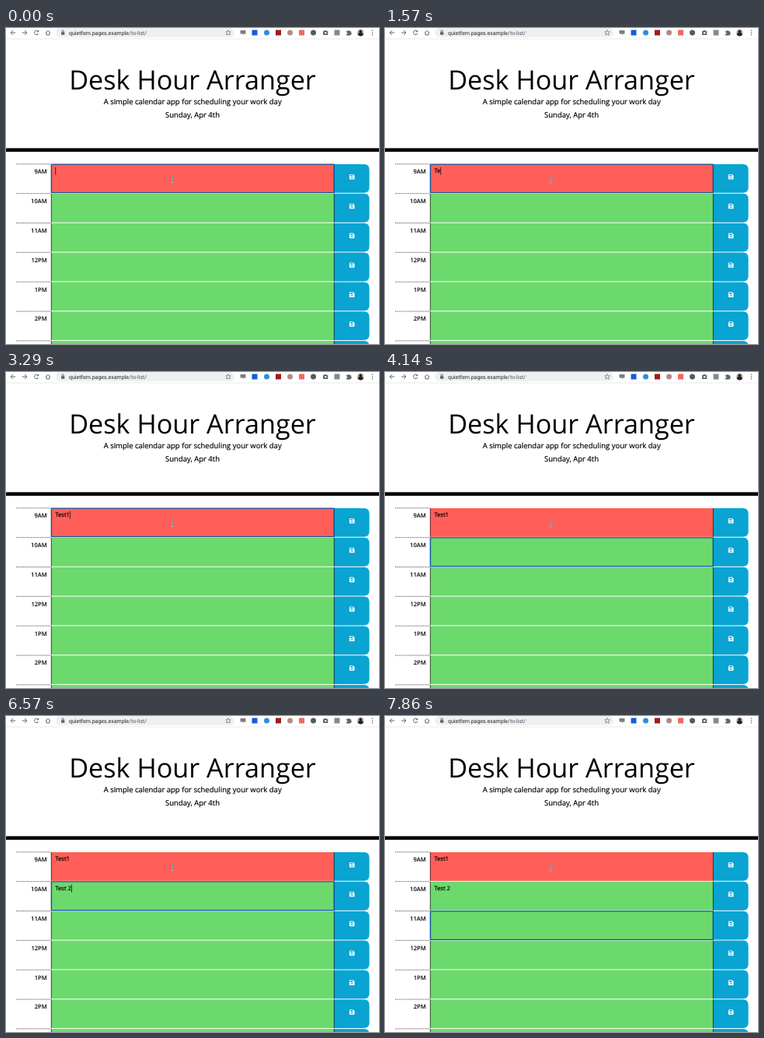
Write an HTML page that moves like this. It is 480 px wide and 406 px high and loops after 8 s.

```html
<!DOCTYPE html>
<html lang="en">
<head>
<meta charset="utf-8">
<title>Day planner</title>
<style>
  html, body { margin: 0; width: 100%; height: 100%; overflow: hidden; background: #fff; }
  svg { display: block; width: 480px; height: 406px; }
  text { font-family: "Open Sans", sans-serif; fill: #000; white-space: pre; text-rendering: geometricPrecision; }
  .mid { text-anchor: middle; }
  .title { font-size: 34.2px; }
  .lead { font-size: 9.5px; }
  .hour { font-size: 7.6px; font-weight: 600; text-anchor: end; }
  .entry { font-size: 7.6px; }
  .lead, .entry { stroke: #000; stroke-width: .18; }
  .url { font: 7px Roboto, sans-serif; fill: #202124; }
  .ui { fill: none; stroke: #5f6368; stroke-width: 1; }
</style>
</head>
<body>
<svg viewBox="0 0 480 406">
  <defs>
    <g id="disk">
      <path d="M-3.3-2.6q0-.7.7-.7h4.3l1.6 1.6v4.3q0 .7-.7.7h-5.2q-.7 0-.7-.7z" fill="#fff"/>
      <path d="M-2.3-2.4h3.7v1.6h-3.7z" fill="#09a4d2"/>
      <circle cy="1.2" r="1" fill="#09a4d2"/>
    </g>
    <path id="beam" d="M212.4 190.2q1.7 0 1.7 1.2q0-1.2 1.7-1.2M214.1 191.4v5.4M212.4 198q1.7 0 1.7-1.2q0 1.2 1.7 1.2"/>
  </defs>

  <g id="toolbar">
    <rect x="64" y="0" width="230" height="12" rx="6" fill="#eef1f3"/>
    <path d="M0 14h480" stroke="#e4e6e8" stroke-width=".8"/>
    <path class="ui" d="M12.2 6H6.4M9 3.2L6.2 6L9 8.8"/>
    <path class="ui" d="M21 6h5.8M24.2 3.2L27 6l-2.8 2.8"/>
    <path class="ui" d="M41.3 4.2A2.7 2.7 0 1 0 41.7 7M41.8 2.8v2h-2"/>
    <path class="ui" d="M51 6.2L54 3.4l3 2.8M52 5.6v3.3h4V5.6"/>
    <rect x="71" y="5.2" width="4.4" height="3.6" rx=".5" fill="#5f6368"/>
    <path class="ui" d="M72 5.4V4.3a1.2 1.2 0 0 1 2.4 0v1.1"/>
    <text class="url" x="81" y="8.6">quietfern.pages.example<tspan fill="#4c5055">/to-list/</tspan></text>
    <path class="ui" style="stroke-width:.7" d="M286 2.6l1 2.2 2.4.2-1.8 1.6.6 2.4-2.2-1.3-2.2 1.3.6-2.4-1.8-1.6 2.4-.2z"/>
    <path d="M301.5 3h7v4.6h-2l-1.4 1.6V7.6h-3.6z" fill="#7b7f84"/>
    <path d="M408 4h1.4l.6-1h2.2l.6 1h1.5v5H408z" fill="#5f6368"/>
    <circle cx="411.2" cy="6.3" r="1.3" fill="#fff"/>
    <path d="M438 4h1.8a1.1 1.1 0 1 1 2.2 0h1.8v1.8a1.1 1.1 0 1 1 0 2.2v1.4H438V7.6a1 1 0 1 0 0-1.8z" fill="#5f6368"/>
    <circle cx="456.3" cy="6" r="4.4" fill="#b9b4b0"/>
    <path d="M452.6 8.4q.6-2.1 2.3-2.4a2 2 0 1 1 2.8 0q1.7.3 2.3 2.4a4.4 4.4 0 0 1-7.4 0z" fill="#25211f"/>
    <g fill="#5f6368"><circle cx="471.5" cy="3.2" r=".8"/><circle cx="471.5" cy="6" r=".8"/><circle cx="471.5" cy="8.8" r=".8"/></g>
  </g>

  <text class="title mid" x="240" y="79">Desk Hour Arranger</text>
  <text class="lead mid" x="240.2" y="97.8">A simple calendar app for scheduling your work day</text>
  <text class="lead mid" x="240" y="114.8">Sunday, Apr 4th</text>
  <rect y="154.4" width="480" height="4.6" fill="#000"/>

  <g id="rows"></g>
  <rect id="ring" x="58.5" width="363.8" height="36.6" rx=".6" fill="none" stroke="#0b56a4" stroke-width="1.3"/>
  <rect id="caret" width=".8" height="9.8" fill="#111"/>
  <g fill="none">
    <use href="#beam" stroke="#ddd" stroke-width="1.4"/>
    <use href="#beam" stroke="#444" stroke-width=".7"/>
  </g>
</svg>
<script>
const NS = "http://www.w3.org/2000/svg";
const LOOP = 8000, FPS = 7, BLINK = 500;
const TOP = 174.7, STEP = 37.85, LEFT = 63.4;
const HOURS = ["9AM", "10AM", "11AM", "12PM", "1PM", "2PM", "3PM"];

// time, focused row, text of that row
const STEPS = [
  [0, 0, ""], [1290, 0, "T"], [1570, 0, "Te"], [1860, 0, "Tes"], [2140, 0, "Test"], [3000, 0, "Test1"],
  [3570, 1, ""], [4860, 1, "T"], [5140, 1, "Te"], [5290, 1, "Tes"], [5430, 1, "Test"],
  [6000, 1, "Test "], [6290, 1, "Test 2"],
  [7290, 2, ""]
];

const $ = id => document.getElementById(id);

function add(parent, tag, attrs, text = "") {
  const el = document.createElementNS(NS, tag);
  for (const k in attrs) el.setAttribute(k, attrs[k]);
  el.textContent = text;
  return parent.appendChild(el);
}

// extension badges: x, colour, round
[[320, "#175ddc", 0], [335.5, "#2d8fd8", 1], [350.5, "#a01c1c", 0], [365.5, "#b58a86", 1],
 [380.5, "#ee6a5f", 0], [395.5, "#55595e", 1], [426, "#85898d", 0]].forEach(([x, fill, round]) =>
  add($("toolbar"), "rect", { x: x - 3.5, y: 2.5, width: 7, height: 7, rx: round ? 3.5 : 0, fill }));

const entries = HOURS.map((hour, i) => {
  const y = TOP + i * STEP, g = $("rows"), h = STEP - 1;
  add(g, "path", { d: `M13 ${y + .1}H58`, stroke: "#222", "stroke-width": .7, "stroke-dasharray": "1.43 .95" });
  add(g, "text", { class: "hour", x: 52.8, y: y + 12.4 }, hour);
  add(g, "rect", { x: 58, y: y + .3, width: 364, height: h, fill: i ? "#6cd96d" : "#ff5f58" });
  add(g, "path", { d: `M422 ${y + .3}h38.6q7 0 7 7v${h - 14}q0 7-7 7h-38.6z`, fill: "#09a4d2" });
  add(g, "path", { d: `M58.3 ${y + .3}v${h}M422.3 ${y + .3}v${h}`, stroke: "#111", "stroke-width": .7 });
  add(g, "use", { href: "#disk", transform: `translate(445.2 ${y + 16.5})` });
  return add(g, "text", { class: "entry", x: LEFT, y: y + 11.6 });
});

function draw(time) {
  const t = Math.floor((time % LOOP + 5) * FPS / 1000) * 1000 / FPS;
  const done = STEPS.filter(s => s[0] <= t + 5);
  const [since, row] = done[done.length - 1];
  entries.forEach((el, i) => {
    const last = done.filter(s => s[1] === i).pop();
    const text = last ? last[2] : "";
    if (el.textContent !== text) el.textContent = text;
  });
  const y = TOP + row * STEP, value = entries[row];
  const width = value.textContent ? value.getComputedTextLength() : 0;
  $("ring").setAttribute("y", y + .4);
  $("caret").setAttribute("x", LEFT + width);
  $("caret").setAttribute("y", y + 4.2);
  $("caret").style.opacity = (t - since) % (2 * BLINK) < BLINK ? 1 : 0;
}

const start = performance.now();
function tick() {
  draw(performance.now() - start);
  requestAnimationFrame(tick);
}
tick();
</script>
</body>
</html>
```
